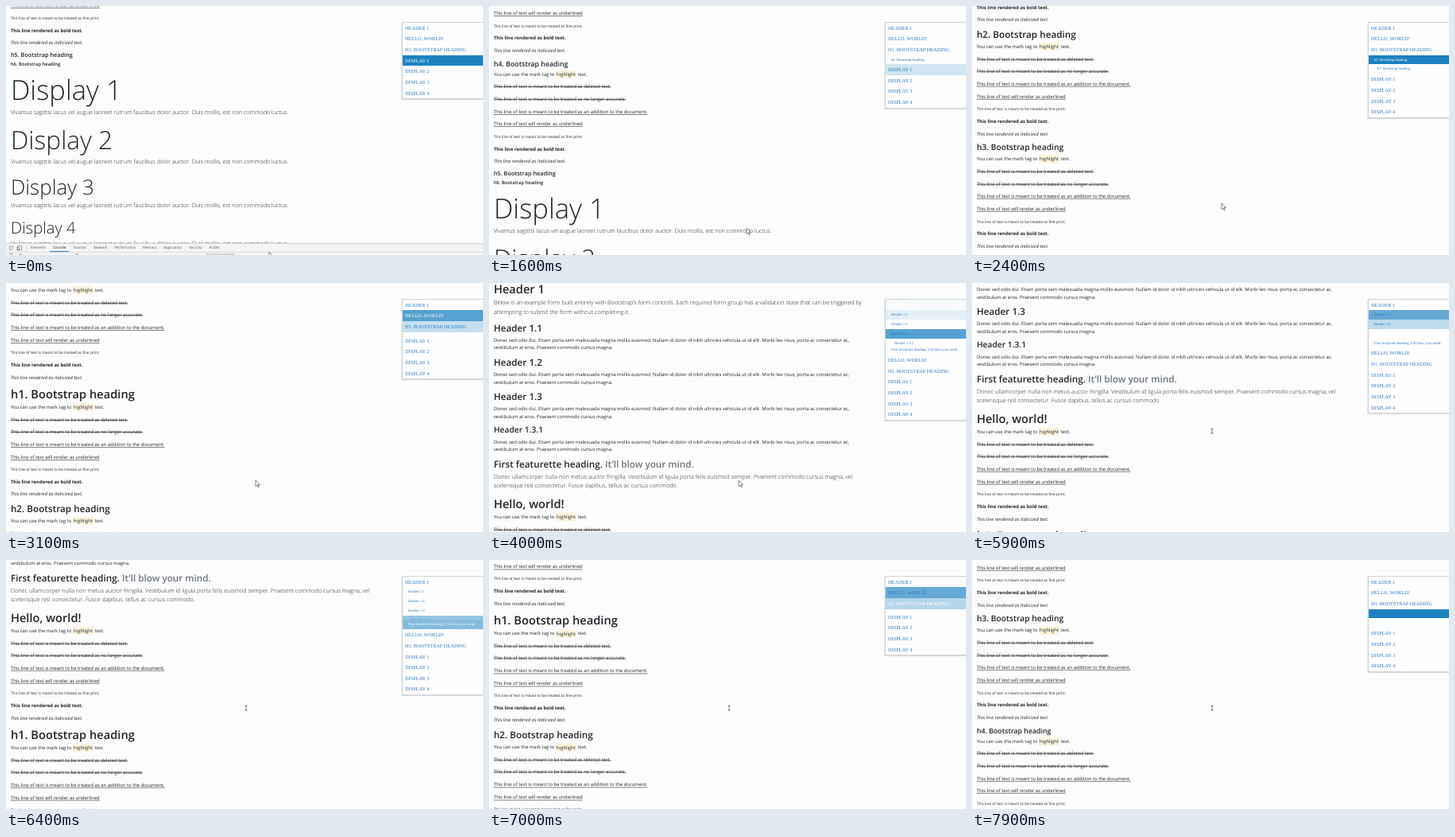
Animation of 600 by 313 pixels, one loop 8 s. Source, as an HTML page:

```html
<!DOCTYPE html>
<html lang="en">
<head>
<meta charset="utf-8">
<title>Table of contents demo</title>
<style>
  html { font-size: 6.25px; }
  html, body { margin: 0; width: 100%; height: 100%; overflow: hidden; background: #fdfdfe; }
  body { position: relative; color: #212529; font-family: "Open Sans", "Noto Sans", sans-serif; text-rendering: geometricPrecision; }

  #doc { position: absolute; left: 5.9px; top: 0; white-space: nowrap; }
  #doc p {
    --k: .947; --l: 1.5;
    position: relative; top: calc(var(--s) * .32px); margin: 0 0 1rem;
    font-size: calc(var(--s) * var(--k) * 6.25px);
    line-height: calc(var(--s) * var(--l) * 6.25px);
  }
  #doc .head { --k: .938; --l: 1.2; font-weight: 600; margin-bottom: .5rem; }
  #doc .display { --k: .924; --l: 1.2; font-weight: 300; margin-bottom: .5rem; }
  #doc .lead { --k: .931; font-weight: 300; }
  #doc small { font-size: .8em; line-height: 1; }
  #doc mark { padding: .2em; color: inherit; background: #fcf4dc; }
  #doc span { color: #6c757d; }
  del, s, ins, u { text-decoration-color: #21252990; }

  #menu {
    position: absolute; left: 498px; top: 19.8px; width: 110px;
    border: 1px solid #d0d4d8; background: #fefefe; box-shadow: 0 .6px 1.5px #0005;
    font-family: "Liberation Serif", "Times New Roman", serif; white-space: nowrap;
  }
  #menu b { display: block; height: 13.67px; padding-left: 3.1px; font: 6.25px/15px "Liberation Serif", serif; }
  #menu .sub { overflow: hidden; }
  #menu .sub b { height: 11.72px; padding-left: 7px; font-size: 4.69px; line-height: 13px; }
  #menu .sub .sub b { padding-left: 11px; }

  #tools { position: absolute; left: 0; top: 298px; width: 100%; height: 15px; background: #f3f3f3; border-top: 1px solid #d4d4d4; box-sizing: border-box; }
  #tabs { position: absolute; left: 31px; top: 0; display: flex; gap: 9px; font-size: 4.43px; line-height: 10px; color: #555; }
  #tabs .on { height: 9px; margin: 0 -4px; padding: 0 4px; color: #222; border-bottom: 1px solid #3b82d8; }
  svg { position: absolute; left: 0; top: 0; overflow: visible; }
</style>
</head>
<body>
<div id="doc"></div>

<div id="menu">
  <b>HEADER 1</b>
  <div class="sub">
    <b>Header 1.1</b><b>Header 1.2</b><b>Header 1.3</b>
    <div class="sub"><b>Header 1.3.1</b></div>
    <b>First featurette heading. It'll blow your mind.</b>
  </div>
  <b>HELLO, WORLD!</b>
  <b>H1. BOOTSTRAP HEADING</b>
  <div class="sub">
    <b>h2. Bootstrap heading</b>
    <div class="sub"><b>h3. Bootstrap heading</b></div>
  </div>
  <b>DISPLAY 1</b><b>DISPLAY 2</b><b>DISPLAY 3</b><b>DISPLAY 4</b>
</div>

<div id="tools">
  <div id="tabs">
    <div>Elements</div><div class="on">Console</div><div>Sources</div><div>Network</div><div>Performance</div>
    <div>Memory</div><div>Application</div><div>Security</div><div>Audits</div>
  </div>
  <svg width="600" height="15" fill="none" stroke="#666" stroke-width=".6">
    <path d="M7 7.5H4.5V3H9V5M6.5 5L9 7.5M14.5 2.5H19.5V7.5H14.5ZM14 4.5H16.5V8H14Z"/>
    <path d="M25.5 2V8.5M0 10.5H600" stroke="#ccc"/>
    <path d="M4 12.5H8V15M16 15A2 2 0 0 1 20 15M87 13H91M89 13V15"/>
    <path d="M252 13.5H288" stroke="#ccc" stroke-width="2"/>
  </svg>
</div>

<svg id="cursor" width="10" height="14">
  <path id="arrow" d="M0 0V7.6L1.8 6L3 8.7L4.2 8.2L3 5.5H5.3Z" fill="#fff" stroke="#333" stroke-width=".6"/>
  <path id="beam" d="M-1.5 -3H1.5M0 -3V3M-1.5 3H1.5" fill="none" stroke="#444" stroke-width=".7"/>
</svg>

<script>
const $ = id => document.getElementById(id);
const LOOP = 8000, STEP = 100;

// ---- page content; sizes in rem ----
const add = (kind, size, html) =>
  $('doc').insertAdjacentHTML('beforeend', `<p class="${kind}" style="--s:${size}">${html}</p>`);
const head = (size, html) => add('head', size, html);
const lead = html => add('lead', 1.25, html);

const samples = [
  'You can use the mark tag to <mark>highlight</mark> text.',
  '<del>This line of text is meant to be treated as deleted text.</del>',
  '<s>This line of text is meant to be treated as no longer accurate.</s>',
  '<ins>This line of text is meant to be treated as an addition to the document.</ins>',
  '<u>This line of text will render as underlined</u>',
  '<small>This line of text is meant to be treated as fine print.</small>',
  '<strong>This line rendered as bold text.</strong>',
  '<em>This line rendered as italicized text.</em>'
];
const filler = 'Donec sed odio dui. Etiam porta sem malesuada magna mollis euismod. Nullam id dolor id nibh ultricies vehicula ut id elit. Morbi leo risus, porta ac consectetur ac,<br>vestibulum at eros. Praesent commodo cursus magna.';

head(2.5, 'Header 1');
lead('Below is an example form built entirely with Bootstrap\'s form controls. Each required form group has a validation state that can be triggered by<br>attempting to submit the form without completing it.');
for (const [n, size] of [['1.1', 2], ['1.2', 2], ['1.3', 2], ['1.3.1', 1.75]]) {
  head(size, 'Header ' + n);
  add('', 1, filler);
}
head(2, 'First featurette heading. <span>It’ll blow your mind.</span>');
lead('Donec ullamcorper nulla non metus auctor fringilla. Vestibulum id ligula porta felis euismod semper. Praesent commodo cursus magna, vel<br>scelerisque nisl consectetur. Fusce dapibus, tellus ac cursus commodo.');
const title = n => `h${n}. Bootstrap heading`;
for (const [size, text] of [[2.5, 'Hello, world!'], [2.5, title(1)], [2, title(2)], [1.75, title(3)], [1.5, title(4)]]) {
  head(size, text);
  samples.forEach(s => add('', 1, s));
}
head(1.25, title(5));
head(1, title(6));
[6, 5.5, 4.5, 3.5].forEach((size, i) => {
  add('display', size, 'Display ' + (i + 1));
  lead('Vivamus sagittis lacus vel augue laoreet rutrum faucibus dolor auctor. Duis mollis, est non commodo luctus.');
});

// ---- motion ----
const scrollKeys = [[0, 930], [700, 930], [1600, 781], [3100, 287], [4000, 2], [4020, 0],
  [5150, 0], [5900, 109.3], [7000, 350.6], [7900, 639.2], [8000, 671]];
const cursorKeys = [[0, 331, 309], [100, 331, 309], [400, 324, 279], [1700, 324, 279], [2100, 314, 248],
  [4050, 314, 248], [5000, 302, 186], [8000, 302, 186]];
// [time, menu row that becomes active]
const activations = [[-9999, 10], [1430, 9], [2070, 8], [2530, 7], [2940, 6], [3290, 5], [3440, 4], [3600, 3],
  [3910, 1], [3960, 0], [5480, 1], [5800, 2], [5880, 3], [6060, 4], [6270, 5], [6480, 6], [6900, 7], [7390, 8], [7870, 9]];

const clamp = x => Math.max(0, Math.min(1, x));
const swing = x => .5 - Math.cos(Math.PI * clamp(x)) / 2;
const fade = ms => swing(ms / 220);
const segment = (keys, t) => Math.max(0, keys.findIndex((k, i) => i === keys.length - 1 || t < keys[i + 1][0]));

// Monotone cubic through the scroll keys
function scrollAt(t) {
  const k = scrollKeys, i = Math.min(segment(k, t), k.length - 2);
  const rate = j => k[j + 1] && k[j] ? (k[j + 1][1] - k[j][1]) / (k[j + 1][0] - k[j][0]) : 0;
  const slope = j => {
    const a = rate(j - 1), b = rate(j);
    return a * b > 0 ? 2 * a * b / (a + b) : 0;
  };
  const end = i + 2 === k.length ? rate(i) : slope(i + 1);
  const d = k[i + 1][0] - k[i][0], s = (t - k[i][0]) / d, r = 1 - s;
  return k[i][1] * r * r * (1 + 2 * s) + k[i + 1][1] * s * s * (3 - 2 * s)
    + d * s * r * (slope(i) * r - end * s);
}

function cursorAt(t) {
  const i = Math.min(segment(cursorKeys, t), cursorKeys.length - 2);
  const [t0, x0, y0] = cursorKeys[i], [t1, x1, y1] = cursorKeys[i + 1];
  const s = swing((t - t0) / (t1 - t0));
  return [x0 + (x1 - x0) * s, y0 + (y1 - y0) * s];
}

function highlight(row, t) {
  return activations.reduce((best, [on, r], i) => {
    if (r !== row || t < on) return best;
    const off = activations[i + 1] ? activations[i + 1][0] : Infinity;
    return Math.max(best, fade(Math.min(t, off) - on) * (1 - fade(t - off)));
  }, 0);
}

// How far a group is unfolded while one of rows first..last is active
function unfolded(first, last, t) {
  let open = false, since = -9999;
  for (const [time, row] of activations) {
    const now = row >= first && row <= last;
    if (time <= t && now !== open) { open = now; since = time; }
  }
  return open ? swing((t - since) / 300) : 1 - swing((t - since) / 260);
}

const rows = [...document.querySelectorAll('#menu b')];
const [headers, deepHeader, headings, deepHeading] = document.querySelectorAll('.sub');
const ROW = 11.72;
function fold(group, deep, count, range, deepRange, t) {
  const inner = ROW * unfolded(...deepRange, t);
  deep.style.height = inner + 'px';
  group.style.height = (ROW * count + inner) * unfolded(...range, t) + 'px';
}

function draw(now) {
  const t = Math.floor(now % LOOP / STEP) * STEP;
  $('doc').style.transform = `translateY(${-scrollAt(t)}px)`;
  $('tools').style.display = t < 200 ? '' : 'none';

  const active = activations[segment(activations, t)][1];
  rows.forEach((row, i) => {
    row.style.color = i === active ? '#fff' : '#2878c4';
    row.style.background = `rgba(30,130,193,${highlight(i, t - 15)})`;
  });
  fold(headers, deepHeader, 4, [0, 5], [3, 4], t);
  fold(headings, deepHeading, 1, [7, 9], [8, 9], t);

  const [x, y] = cursorAt(t);
  $('cursor').style.transform = `translate(${x}px,${y}px)`;
  $('arrow').style.display = t < 4600 ? '' : 'none';
  $('beam').style.display = t < 4600 ? 'none' : '';
  requestAnimationFrame(tick);
}
const start = performance.now();
function tick() { draw(performance.now() - start); }
tick();
</script>
</body>
</html>
```
